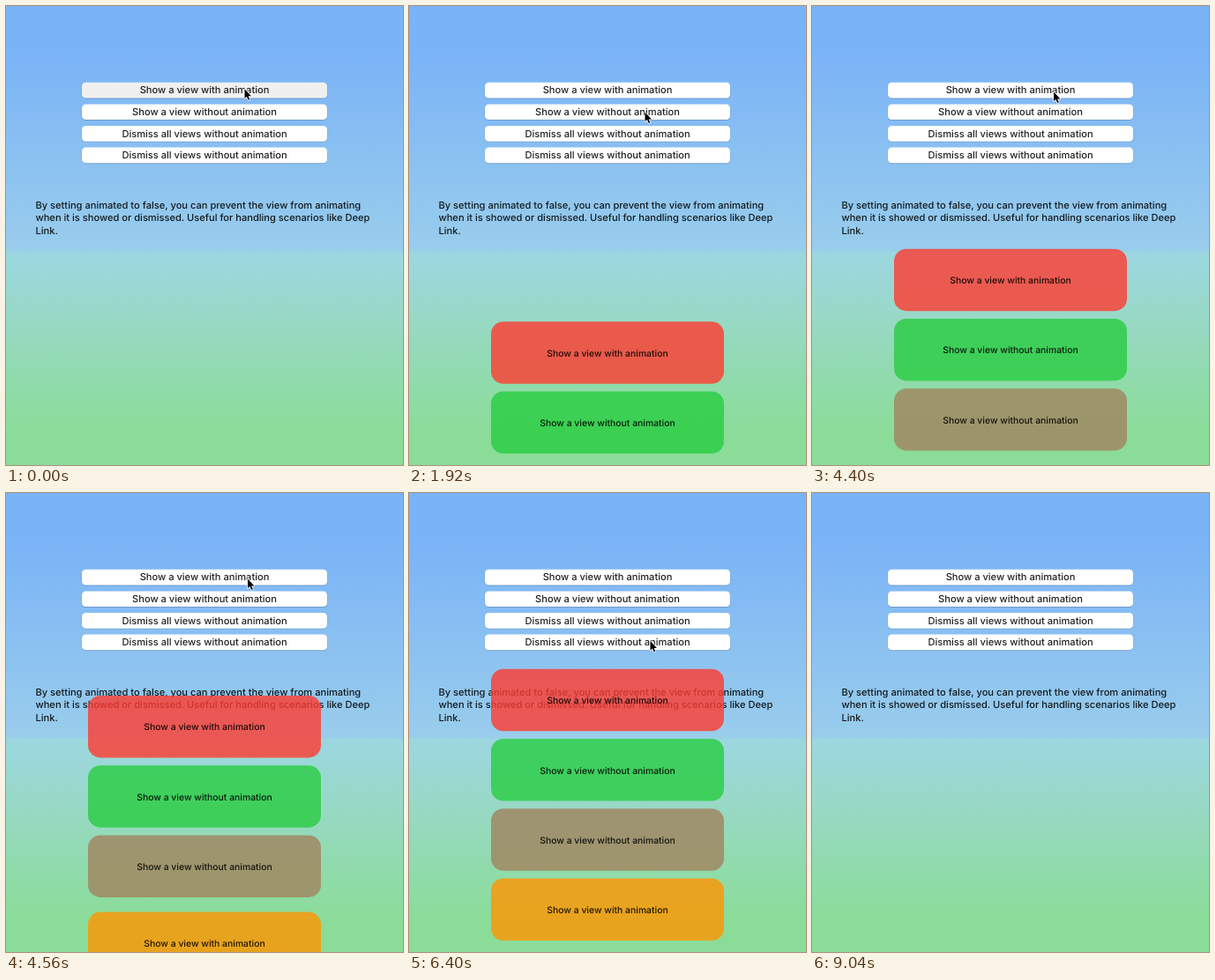
An HTML page for the animation above (9.12 s loop, 450x521 px).

```html
<!DOCTYPE html>
<html lang="en">
<head>
<meta charset="utf-8">
<title>Animated views</title>
<style>
  html, body { margin: 0; width: 100%; height: 100%; overflow: hidden; }
  svg { display: block; width: 100vw; height: 100vh; }
  text {
    font: 500 11.1px Inter, "Open Sans", sans-serif;
    fill: rgba(0, 0, 0, .87);
    text-rendering: geometricPrecision;
  }
  .centered text { text-anchor: middle; }
  .card text { font-size: 10.4px; }
  .shadow { fill: rgba(0, 0, 0, .17); }
</style>
</head>
<body>
<svg viewBox="0 0 450 521">
  <defs>
    <linearGradient id="sky" x2="0" y2="1">
      <stop offset="0" stop-color="#79b2f7"/>
      <stop offset=".1" stop-color="#7ab3f7"/>
      <stop offset=".53" stop-color="#99cdec"/>
      <stop offset=".538" stop-color="#9cd7e0"/>
      <stop offset=".65" stop-color="#9ad8cc"/>
      <stop offset=".82" stop-color="#90dbab"/>
      <stop offset=".94" stop-color="#8bdc98"/>
    </linearGradient>
  </defs>
  <rect width="450" height="521" fill="url(#sky)"/>
  <g id="buttons" class="centered"></g>
  <text x="33.5" y="230.3">By setting animated to false, you can prevent the view from animating</text>
  <text x="33.5" y="244.4">when it is showed or dismissed. Useful for handling scenarios like Deep</text>
  <text x="33.5" y="258.5">Link.</text>
  <g id="cards" class="centered"></g>
  <path id="cursor" d="M0 0V10.6L2.4 8.5L4.2 12.5L5.8 11.8L4.1 7.9H7.4Z"
        stroke="#fff" stroke-width="1.5" stroke-linejoin="round" paint-order="stroke"/>
</svg>
<script>
const LOOP = 9120, SLIDE = 350, DISMISS = 6840;
const CARD_Y = 437.5, CARD_PITCH = 79.25, ENTRY_OFFSET = 100;
const SHOW = "Show a view with animation";
const SHOW_NOW = "Show a view without animation";
const DISMISS_ALL = "Dismiss all views without animation";

const cards = [
  { at: 60, label: SHOW, color: "rgb(255,59,48)", slides: true },
  { at: 1500, label: SHOW_NOW, color: "rgb(40,205,65)" },
  { at: 2460, label: SHOW_NOW, color: "rgb(162,132,94)" },
  { at: 4358, label: SHOW, color: "rgb(255,149,0)", slides: true },
];

// [button index, start, end]
const presses = [[0, 0, 60], [1, 1400, 1500], [1, 2360, 2460], [0, 4250, 4358], [3, 6730, DISMISS]];

// [time, x, y]
const cursorPath = [
  [0, 270.5, 94.3], [400, 271.5, 94.3], [750, 271.5, 94.3], [1200, 267.5, 120.5], [3500, 267.5, 120.5],
  [4100, 274, 97.5], [4780, 274, 97.5], [5240, 273, 179], [5900, 273, 179],
  [6400, 273.5, 168], [7500, 273.5, 168], [8250, -14, 150], [LOOP, -14, 150],
];

const clamp = v => Math.min(1, Math.max(0, v));
const ease = p => p * p * (3 - 2 * p);
const byId = id => document.getElementById(id);

function addGroup(parent, markup, className = "") {
  const group = document.createElementNS("http://www.w3.org/2000/svg", "g");
  group.setAttribute("class", className);
  group.innerHTML = markup;
  return parent.appendChild(group);
}

const buttonFaces = [SHOW, SHOW_NOW, DISMISS_ALL, DISMISS_ALL].map((label, i) => {
  const y = 86.8 + i * 24.6;
  return addGroup(byId("buttons"), `
    <rect class="shadow" x="85.7" y="${y + .3}" width="278.6" height="18.3" rx="4.6"/>
    <rect class="face" x="86" y="${y}" width="278" height="17.7" rx="4.3"/>
    <text x="225" y="${y + 12.5}">${label}</text>`).querySelector(".face");
});

for (const card of cards) {
  card.node = addGroup(byId("cards"), `
    <rect x="93" width="264" height="70.5" rx="14" fill="${card.color}" fill-opacity=".8"/>
    <text x="225" y="39.5">${card.label}</text>`, "card");
}

function progress(card, t) {
  if (!card.slides) return t >= card.at ? 1 : 0;
  return ease(clamp((t - card.at) / SLIDE));
}

function cursorAt(t) {
  const i = Math.max(1, cursorPath.findIndex(([time]) => time > t));
  const [t0, x0, y0] = cursorPath[i - 1], [t1, x1, y1] = cursorPath[i];
  const p = ease((t - t0) / (t1 - t0));
  return [x0 + (x1 - x0) * p, y0 + (y1 - y0) * p];
}

function render(t) {
  let raised = 0;
  for (const card of [...cards].reverse()) {
    const p = progress(card, t);
    const y = CARD_Y - raised * CARD_PITCH + (1 - p) * ENTRY_OFFSET;
    card.node.setAttribute("transform", `translate(0 ${y})`);
    card.node.style.display = t >= card.at && t < DISMISS ? "" : "none";
    raised += p;
  }
  buttonFaces.forEach((face, i) => {
    const pressed = presses.some(([button, start, end]) => button === i && t >= start && t < end);
    face.setAttribute("fill", pressed ? "#f0f0f0" : "#fff");
  });
  byId("cursor").setAttribute("transform", `translate(${cursorAt(t)})`);
}

function tick() {
  render(performance.now() % LOOP);
  requestAnimationFrame(tick);
}
tick();
</script>
</body>
</html>
```
